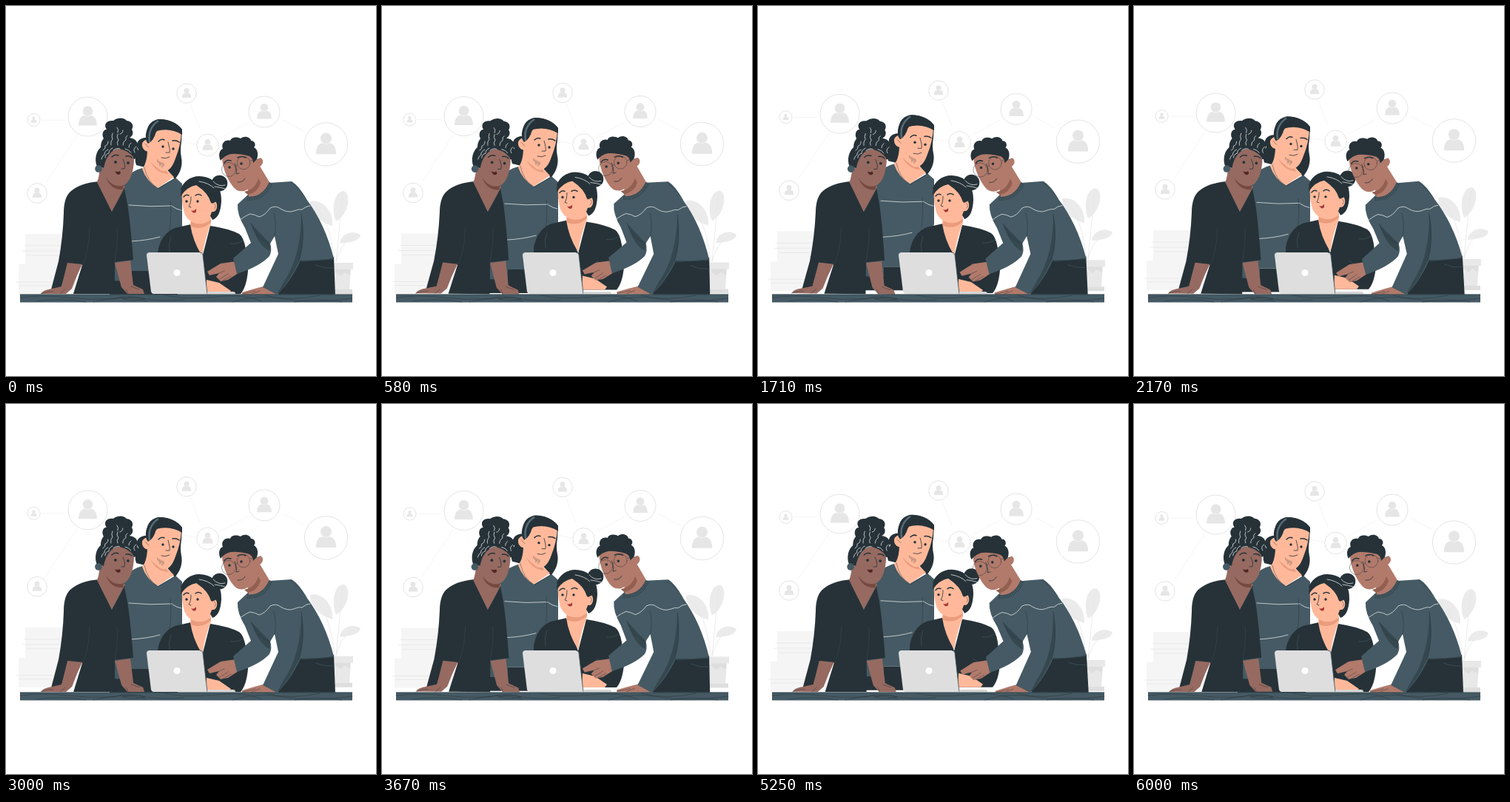
These frames come from a looping animation (500 px wide and 500 px high, 6.04 s). An HTML page:

```html
<!DOCTYPE html>
<html lang="en">
<head>
<meta charset="utf-8">
<title>Team at a laptop</title>
<style>
html, body { margin: 0; width: 100%; height: 100%; overflow: hidden; background: #fff; }
svg { display: block; width: 100vw; height: 100vh; }
.ink { fill: #263238; }
.blue { fill: #455a64; }
.pale { fill: #ffb99a; }
.tan { fill: #b17a6b; }
.brown { fill: #966a61; }
.line { fill: none; stroke: #263238; stroke-width: .8; stroke-linecap: round; stroke-linejoin: round; }
.thin { stroke-width: .45; }
.brow { stroke-width: 1.5; }
.light { fill: none; stroke: #dfe3e5; stroke-width: .8; stroke-linecap: round; }
.fold { fill: none; stroke: #455a64; stroke-width: .6; }
.soft { fill: #f5f5f5; }
.gray { fill: #ebebeb; }
.rule { fill: none; stroke: #e6e6e6; stroke-width: .8; }
.link { stroke: #f1f1f1; }
</style>
</head>
<body>
<svg viewBox="0 0 500 500">
  <defs>
    <g id="user">
      <circle r="26.5" fill="#fff" stroke="#e4e4e4" vector-effect="non-scaling-stroke"/>
      <circle cy="-7.5" r="6.8" fill="#e6e6e6"/>
      <path d="M-12.5 12Q-12-1-4-1.500Q0 1 4-1.500Q12-1 12.500 12Z" fill="#e6e6e6"/>
    </g>
  </defs>

  <g id="back">
    <path class="rule link" d="M49 154H80M96 175L55 237M249 133L262 166M239 183L257 187M290 178L327 158M374 154L402 169"/>
    <g id="users"></g>
    <path class="soft" d="M26 308H96V349H26ZM17 349H96V389H17Z"/>
    <path class="rule" d="M24 324H90M22 331H90M28 337H90M14 373H90M17 378H90"/>
    <path class="gray" d="M446 291C439 273 444 251 456 250C467 252 464 281 446 291ZM451 321C453 306 471 302 479 310C477 318 463 320 451 321ZM441 297C424 293 410 278 411 264C426 260 443 276 441 297Z"/>
    <path class="rule" d="M455 253Q452 284 446 346M478 309Q455 312 446 346M413 266Q438 286 444 346"/>
    <path d="M436 347H469V356H466L464 383H440Z" fill="#e8e8e8"/>
    <path d="M438 383H468V389H438ZM445 356V359L452 365 457 360 465 364V356Z" fill="#dedede"/>
  </g>

  <g id="longhair">
    <path class="ink" d="M191 178C181 177 173 185 179 194Q172 205 176 215L188 218 205 205 228 234C236 226 239 214 237 205Q235 195 237 184L238 167C231 158 219 152 205 153 194 156 188 165 191 178Z"/>
    <path class="ink" d="M140 358H232V390H140Z"/>
    <path class="blue" d="M188 218Q169 222 160 235L140 344V371L170 372V358H225L238 300V240L229 232 205 246Z"/>
    <path class="pale" d="M191 186Q192 211 184 220Q190 237 205 246Q217 238 227 231L214 218Z"/>
    <path d="M195 210Q204 221 217 223L219 227Q203 226 195 210Z" fill="#e99d7f"/>
    <path class="pale" d="M200 174C195 181 186 179 184 186 183 194 191 199 195 195 195 207 203 220 211 223 219 225 225 218 229 206Q236 189 237 171L209 163Z"/>
    <path class="ink" d="M192 186Q200 182 203 169Q222 164 238 174V167Q229 154 208 153C190 157 187 174 190 183Z"/>
    <path d="M194 184Q191 165 206 155" fill="none" stroke="#546b78" stroke-width="2.500"/>
    <path class="line" d="M219 184Q222 194 221 198L216 198M210 205Q216 207 221 204"/>
    <path class="line brow" d="M206 183Q210 179 214 181M225 182Q230 181 234 184"/>
    <circle class="ink" cx="212" cy="190" r="1.700"/><circle class="ink" cx="226" cy="193" r="1.700"/>
    <path class="line thin" d="M205 208v3M207 210v3M209 211v3M211 212v3M213 213v3M208 214v2M211 216v2M188 186l5 5"/>
    <path class="light" d="M166 269Q195 272 224 270M225 271Q231 275 237 276M168 318Q190 317 208 312"/>
    <path class="line thin" d="M221 304Q224 280 222 264M187 218Q191 238 206 247L230 232"/>
  </g>

  <g id="standing">
    <path class="ink" d="M126 237Q101 239 88 250Q78 258 78 280Q77 312 71 345L61 383 75 380 84 348 103 350 91 389H147L147 346 172 343Q168 292 164 267L159 242 143 277Z"/>
    <path class="brown" d="M83 347L103 349Q95 365 89 382L81 389H47Q49 384 62 382L75 379ZM147 347L168 344 172 377 185 383 187 389H164L156 380Z"/>
    <path class="line thin" d="M47 389Q57 385 63 386M73 389L80 383M169 379L180 383M165 389L162 383"/>
    <path class="brown" d="M127 216Q126 232 123 238L143 278 161 244Z"/>
    <path d="M135 231Q146 244 159 242L158 248Q141 249 135 231Z" fill="#75493f"/>
    <path class="ink" d="M123 217C119 207 122 196 128 191Q128 183 132 179C128 172 133 166 136 167 131 159 137 154 145 155 152 150 160 151 163 155 171 156 173 162 170 167 173 171 171 176 167 178 176 179 180 186 177 192 182 199 177 207 172 207Z"/>
    <path class="brown" d="M131 211Q136 195 154 190Q171 193 173 209C172 226 167 241 156 243 144 245 134 234 131 222Z"/>
    <path class="ink" d="M126 217Q121 199 136 187Q157 180 174 197L173 205Q163 193 150 193Q136 198 132 219Z"/>
    <path class="light" d="M129 207q1-5 4-6q0-5 5-7M134 205q0-5 5-6q0-5 5-7M131 195q4-2 3-6q4-1 4-6M142 188q-1-5 2-8q-2-4 0-8M151 188q-2-4 1-7q-3-4-1-8M158 188q0-5 4-7q-1-4 2-6M166 191q0-4 3-6M150 164q3 3 1 7M158 168q0 4-4 5M145 195q5-4 9-2M161 193q5 1 8 5M176 190q-5 3-2 8"/>
    <circle class="blue" cx="125" cy="220" r="4.800"/>
    <path class="line" d="M158 207Q162 215 160 220L156 220"/>
    <path class="line brow" d="M143 204Q147 200 152 202M162 203Q167 202 170 205"/>
    <circle class="ink" cx="148" cy="211" r="1.900"/><circle class="ink" cx="165" cy="212" r="1.900"/>
    <path d="M147 223Q151 225 154 223L155 226Q151 231 147 223Z" fill="#4f2826"/>
    <path class="fold" d="M147 346Q152 314 150 300M113 299Q112 333 104 349M142 278Q149 270 160 245" opacity=".55"/>
  </g>

  <g id="seated">
    <path class="ink" d="M205 333Q209 308 228 300L250 295 265 340 276 297Q302 301 315 308Q321 312 324 328L327 358Q325 380 317 389H207Z"/>
    <path class="pale" d="M250 284L249 295Q252 317 265 338Q269 313 277 294V280ZM271 370L288 374 304 385 301 389H270Z"/>
    <path d="M250 291Q266 299 277 288V292Q265 304 250 298Z" fill="#ea9c7c"/>
    <circle class="ink" cx="288.500" cy="239.500" r="10.800"/>
    <path class="ink" d="M236 248C239 238 249 230 261 230 280 230 292 244 291 264 290 278 287 286 279 289L265 263Z"/>
    <path class="pale" d="M238 252Q237 262 240 276C242 287 251 294 261 294 272 293 276 285 278 278 285 280 288 268 282 263L277 266Q273 252 259 242Q247 241 238 252Z"/>
    <path class="ink" d="M236 257Q236 234 258 231Q278 234 284 252L283 265 278 267Q274 253 257 242Q245 244 236 257Z"/>
    <path class="light" d="M261 237Q274 239 281 246M280 237Q287 245 296 242M282 244Q290 245 296 247"/>
    <path class="line" d="M250 258Q250 267 247 271L250 272"/>
    <path class="line brow" d="M240 258Q243 254 247 256M256 256Q260 253 264 256"/>
    <circle class="ink" cx="244" cy="264" r="1.700"/><circle class="ink" cx="259" cy="264" r="1.700"/>
    <path d="M250 276Q254 278 257 274L257 278Q254 282 250 276Z" fill="#a7373a"/>
    <path class="fold" d="M303 321Q313 322 320 317M290 350Q305 362 320 359M223 312Q219 322 221 333"/>
    <path class="line thin" d="M281 267Q285 269 282 274"/>
  </g>

  <g id="pointing">
    <path class="ink" d="M392 339L443 339 445 392H366Z"/>
    <path class="tan" d="M311 345L290 348Q280 354 272 359L275 364 288 361 284 366 290 372 300 370 314 361Z"/>
    <path class="line thin" d="M288 361L295 358M289 369L300 362M293 371L304 365"/>
    <path class="tan" d="M351 378L336 382 319 387V390H366Z"/>
    <path class="line thin" d="M320 389L337 385M332 389L343 385"/>
    <path class="blue" d="M328 254L313 268Q312 282 323 300L331 320 307 341 312 362Q343 352 356 338Q360 330 357 321L363 311 368 335 347 380 366 390Q384 374 398 344Q422 344 443 341Q431 294 406 261Q396 243 386 237L356 239Z"/>
    <path d="M399 281Q405 316 396 345Q383 373 366 390L376 372Q399 338 399 281ZM331 294L357 321 356 331Q341 324 331 294Z" fill="#35474f"/>
    <path class="tan" d="M326 244L329 262Q347 261 356 238L341 213Z"/>
    <path d="M322 251Q337 248 341 233L344 239Q340 252 327 255Z" fill="#925f51"/>
    <path class="tan" d="M292 204C292 219 300 235 306 243Q312 252 322 250C336 245 341 231 340 218 347 217 350 208 344 205L338 208 332 194Q306 192 292 204Z"/>
    <path class="ink" d="M290 209C286 201 289 194 293 193 290 185 297 180 303 182 305 176 314 177 317 179 323 174 331 178 331 182 337 182 338 189 335 191 341 194 341 202 339 207L334 212Q334 206 329 203Q315 199 304 200Q295 202 290 209Z"/>
    <path d="M325 260Q348 262 358 239" fill="none" stroke="#35474f" stroke-width="5"/>
    <path d="M325 260Q348 262 358 239" fill="none" stroke="#607985" stroke-width="4" stroke-dasharray=".5 1.800"/>
    <g class="line thin"><circle cx="301" cy="221" r="9.500"/><circle cx="321" cy="212" r="8.800"/><path d="M310 217l3-2M330 209l11-2"/></g>
    <path class="line" d="M309 213Q313 222 311 227L315 226M313 238Q320 239 323 233"/>
    <path class="line brow" d="M295 212Q298 207 304 209M313 205Q318 202 324 205"/>
    <circle class="ink" cx="302" cy="218" r="1.800"/><circle class="ink" cx="318" cy="213" r="1.800"/>
    <path class="light" d="M315 290Q324 283 330 281Q337 282 342 285Q350 283 357 273Q365 269 371 274Q381 280 389 277Q396 274 400 275Q406 270 411 270"/>
    <path class="line thin" d="M363 311Q366 295 362 280M399 281Q405 316 396 345M331 294Q339 315 357 321M386 239Q401 252 406 261M415 350Q430 354 443 352"/>
    <path class="fold" d="M399 345L443 342M418 350Q430 355 442 354"/>
  </g>

  <path d="M264 333L271 386 272 389H268Z" fill="#263238"/>
  <path d="M194 333H262Q265 333 266 336L272 389H199Q197 389 196 386L190 337Q190 333 194 333Z" fill="#dedede"/>
  <path d="M262 333Q265 333 266 336L272 389" fill="none" stroke="#37474f" stroke-width=".8"/>
  <path d="M272 386H307Q310 386 310 389H272Z" fill="#d5d5d5"/>
  <circle cx="231" cy="360.500" r="4.500" fill="#fff"/>
  <rect class="blue" x="19" y="389.500" width="449" height="11"/>
  <path class="line thin" d="M19 390H468M19 394Q53 390 84 394T146 396Q161 390 184 395T241 397M118 400Q159 389 190 399M158 396Q173 391 188 396Q174 400 158 396M215 391Q240 397 283 393T345 399M306 400Q340 389 376 396T468 395M350 391Q385 400 424 391M42 399Q74 394 108 400M390 400Q420 394 454 400"/>
</svg>
<script>
const $ = id => document.getElementById(id);
const LOOP = 6040, TURN = 2 * Math.PI;

// x, y, radius
const users = [[110.5, 149.5, 26.5], [244, 118, 13.2], [349, 143, 21], [432.5, 187, 29.2],
  [272.5, 188, 14.8], [37.5, 154, 8.5], [42, 253, 13.3]];
$('users').innerHTML = users.map(([x, y, r]) =>
  `<use href="#user" transform="translate(${x} ${y}) scale(${r / 26.5})"/>`).join('');

const move = (id, value) => $(id).setAttribute('transform', value);
const rise = (id, height, phase) =>
  move(id, `translate(0 ${-height * (1 - Math.cos(TURN * phase)) / 2})`);
const sway = (id, x, y, phase) =>
  move(id, `rotate(${Math.sin(TURN * phase)} ${x} ${y})`);

function draw(now) {
  const p = now % LOOP / LOOP;
  rise('back', 6.2, p);
  rise('longhair', 6, 2 * p);
  rise('seated', 6.4, 4 * p);
  sway('standing', 118, 271, 4 * p);
  sway('pointing', 365, 289, 2 * p);
  requestAnimationFrame(draw);
}
draw(performance.now());
</script>
</body>
</html>
```
